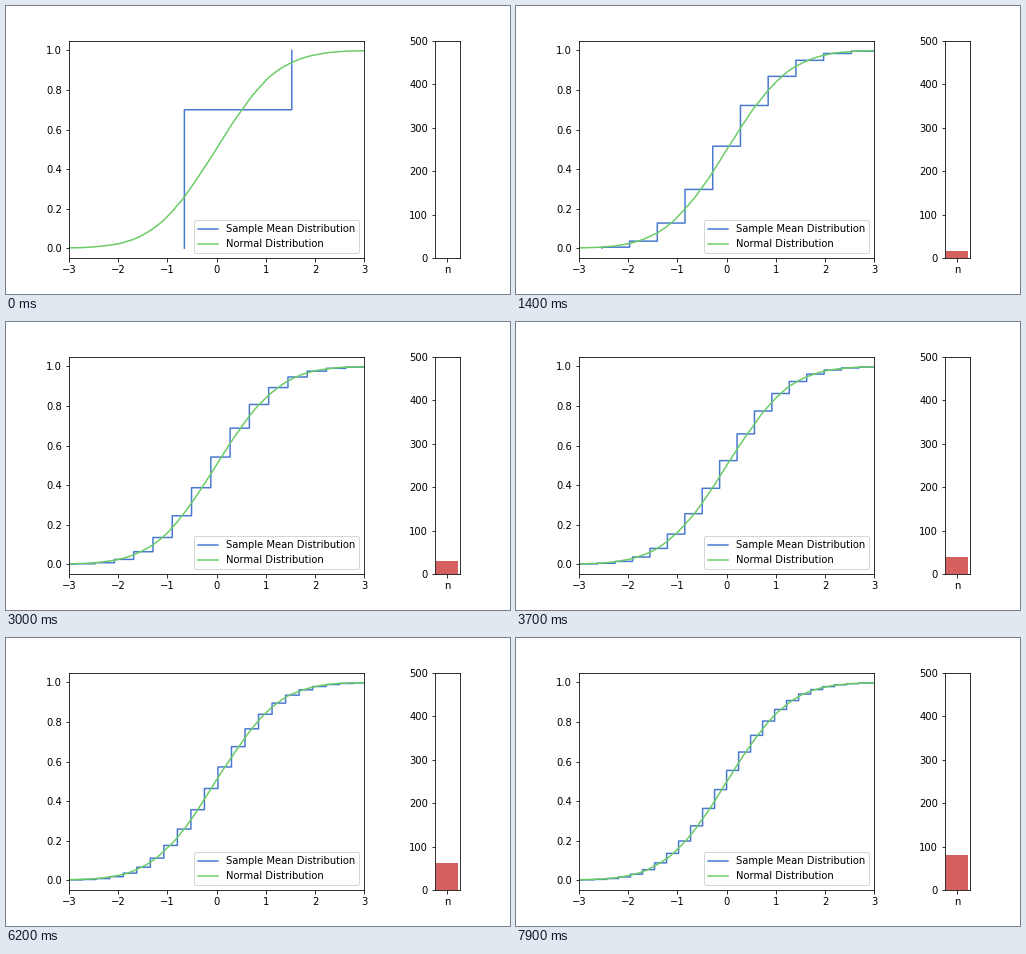
A matplotlib script for the animation above (8000 ms loop, 504x288 px).

```python
import math

import numpy as np
import matplotlib.pyplot as plt
from matplotlib.animation import FuncAnimation

W, H, DPI = 504, 288, 72
STEPS = 80
P = 0.3
DRAWS = 20000
BLUE, GREEN, RED = "#4878CF", "#6ACC65", "#D65F5F"


def binomial_steps(n):
    """Step curve of the standardised mean of n Bernoulli draws."""
    k = np.arange(n + 1)
    pmf = [math.comb(n, i) * P**i * (1 - P) ** (n - i) for i in range(n + 1)]
    cdf = np.cumsum(pmf)
    x = (k - n * P) / math.sqrt(n * P * (1 - P))
    y = np.column_stack([np.append(0, cdf[:-1]), cdf])
    return np.repeat(x, 2), y.ravel()


def normal_curve(seed):
    draws = np.random.default_rng(seed).standard_normal(DRAWS)
    return np.sort(draws), np.linspace(0, 1, DRAWS)


def add_axes(left, width):
    return fig.add_axes([left / W, 0.125, width / W, 0.755])


fig = plt.figure(figsize=(W / DPI, H / DPI), dpi=DPI)

ax = add_axes(63, 295.2)
mean_line, = ax.plot([], [], color=BLUE, lw=1.5, snap=False,
                     label="Sample Mean Distribution")
normal_line, = ax.plot([], [], color=GREEN, lw=1.5,
                       label="Normal Distribution")
ax.set_xlim(-3, 3)
ax.set_ylim(-0.05, 1.05)
ax.legend(loc="lower right")

bar_ax = add_axes(429, 24.6)
bar = bar_ax.bar([0], [1], color=RED)[0]
bar_ax.set_xticks([0], ["n"])
bar_ax.set_ylim(0, 500)


def update(i):
    n = i + 1
    mean_line.set_data(*binomial_steps(n))
    normal_line.set_data(*normal_curve(n))
    bar.set_height(n)
    return mean_line, normal_line, bar


anim = FuncAnimation(fig, update, frames=STEPS, interval=100,
                     repeat=True, repeat_delay=0, blit=False)
plt.show()
```
